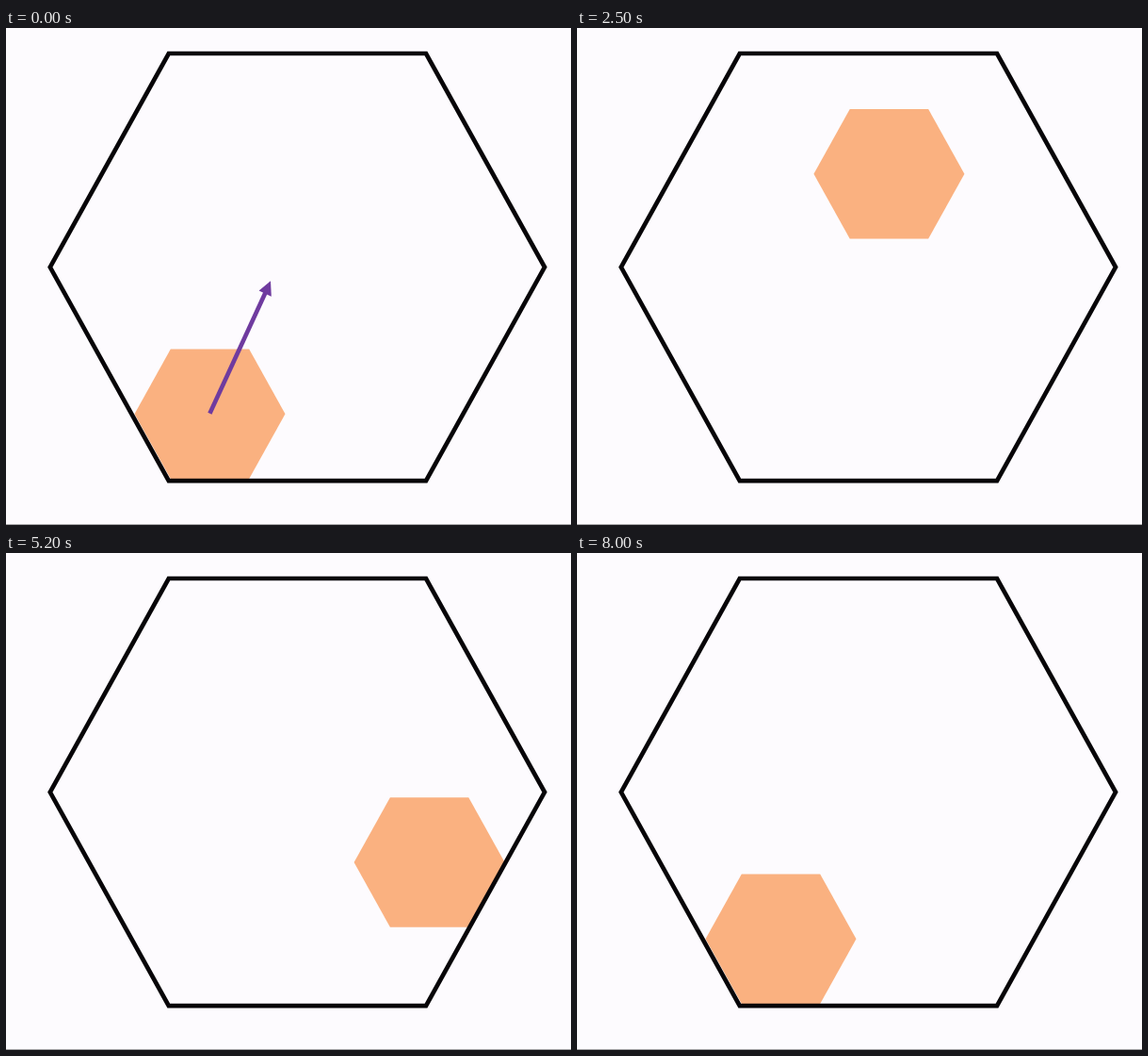
Animation, 600 px wide and 527 px high, one loop 8100 ms. Source, as an HTML page with a canvas:

```html
<!DOCTYPE html>
<html lang="en">
<head>
<meta charset="utf-8">
<title>Bouncing hexagon</title>
<style>
html, body { margin: 0; width: 100%; height: 100%; overflow: hidden; background: #fdfbfe; }
canvas { display: block; }
</style>
</head>
<body>
<canvas id="stage" width="600" height="527"></canvas>
<script>
const ctx = document.getElementById('stage').getContext('2d');
const LOOP = 8100, STEP = 100;
const HOME = [216.5, 409.2], TOP = [357.5, 97], RIGHT = [449.6, 328];

// ramp: share of the time spent speeding up, and again slowing down
const legs = [
  { from: HOME, to: TOP, start: 1248, length: 1799, ramp: 0.5 },
  { from: TOP, to: RIGHT, start: 3276, length: 1737, ramp: 0.5 },
  { from: RIGHT, to: HOME, start: 5236, length: 1762, ramp: 0.41 }
];

const clamp = x => Math.min(1, Math.max(0, x));

function ease(u, ramp) {
  if (u > 0.5) return 1 - ease(1 - u, ramp);
  const speed = 1 / (1 - ramp);
  return u < ramp ? speed * u * u / (2 * ramp) : speed * (u - ramp / 2);
}

function position(t) {
  let leg = legs[0];
  for (const l of legs) if (t >= l.start) leg = l;
  const p = ease(clamp((t - leg.start) / leg.length), leg.ramp);
  return leg.from.map((v, i) => v + (leg.to[i] - v) * p);
}

function tracePath(points) {
  ctx.beginPath();
  points.forEach(([x, y]) => ctx.lineTo(x, y));
  ctx.closePath();
}

function traceHexagon(x, y, wide, flat, high) {
  tracePath([
    [x - wide, y], [x - flat, y - high], [x + flat, y - high],
    [x + wide, y], [x + flat, y + high], [x - flat, y + high]
  ]);
}

function drawArrow(alpha) {
  ctx.save();
  ctx.globalAlpha = alpha;
  ctx.strokeStyle = ctx.fillStyle = '#6f3b9f';
  ctx.lineWidth = 4.6;
  ctx.beginPath();
  ctx.moveTo(216.4, 408.8);
  ctx.lineTo(276, 279.5);
  ctx.stroke();
  tracePath([[281, 268.3], [268.6, 278.6], [281.8, 284.8]]);
  ctx.fill();
  ctx.restore();
}

function draw(t) {
  ctx.fillStyle = '#fdfbfe';
  ctx.fillRect(0, 0, 600, 527);
  ctx.fillStyle = '#a6a5a7';
  ctx.fillRect(0, 526, 600, 1);

  ctx.fillStyle = '#fab180';
  traceHexagon(...position(t), 80, 41.7, 68.8);
  ctx.fill();

  ctx.strokeStyle = '#070508';
  ctx.lineWidth = 4.7;
  traceHexagon(309.4, 253.6, 262.6, 136.6, 226.6);
  ctx.stroke();

  const alpha = 1 - clamp((t - 950) / 300);
  if (alpha > 0) drawArrow(alpha);
}

const begin = performance.now();
function tick() {
  const t = (performance.now() - begin) % LOOP;
  draw(Math.floor(t / STEP) * STEP);
  requestAnimationFrame(tick);
}
tick();
</script>
</body>
</html>
```
